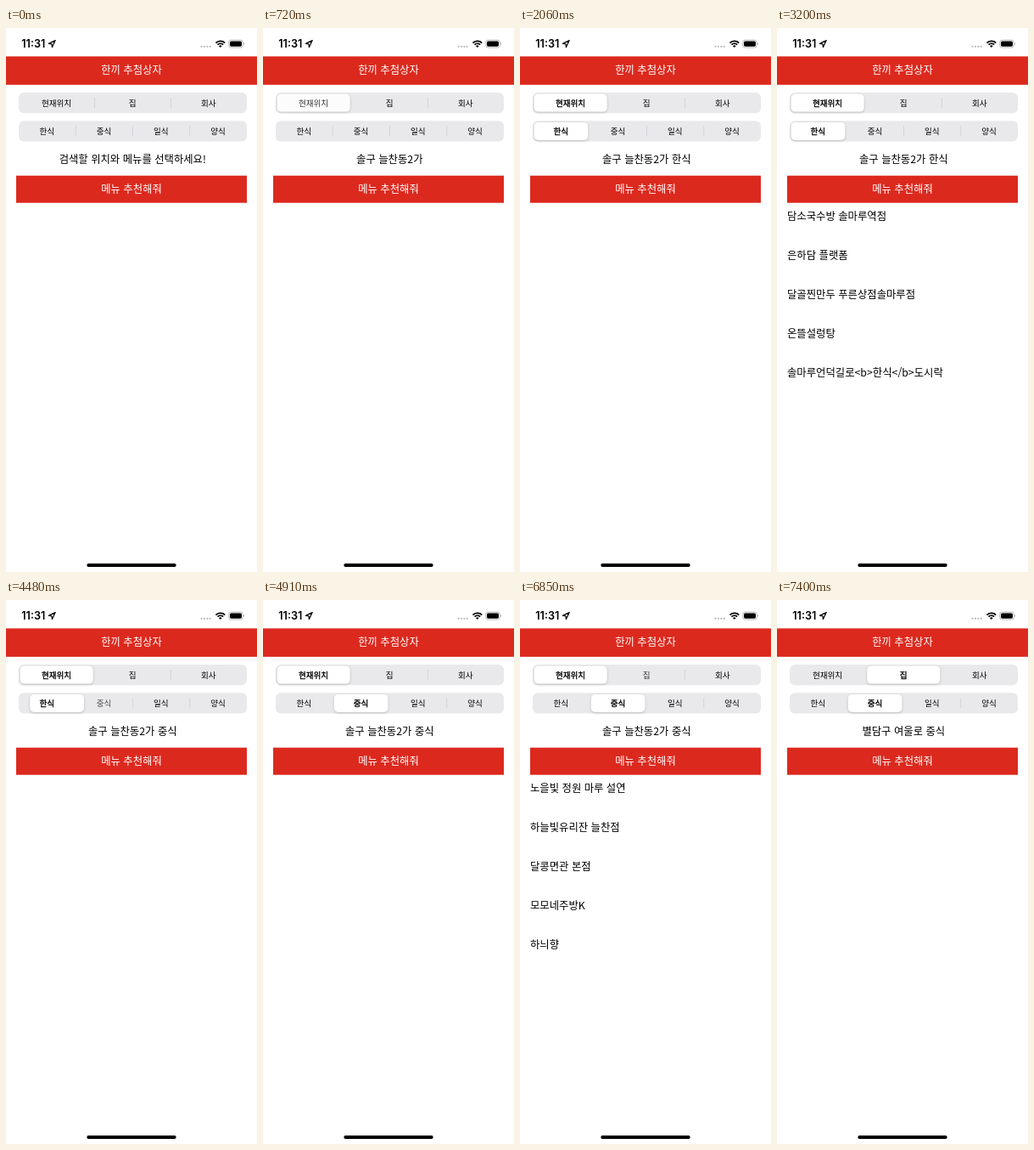
Write an HTML page that moves like this. It is 296 px wide and 640 px high and loops after 8 s.

```html
<!DOCTYPE html>
<html lang="ko">
<head>
<meta charset="utf-8">
<title>메뉴 추천</title>
<style>
  html, body { margin: 0; width: 100%; height: 100%; overflow: hidden; background: #fff; }
  svg { display: block; width: 100%; height: 100%; }
  text { font: 12.35px "Noto Sans CJK KR", "Noto Sans CJK JP", sans-serif; white-space: pre; }
  .mid { text-anchor: middle; }
  .light { fill: #fff; }
  .clock { font: 600 12.6px Inter, sans-serif; }
  .option { font-size: 9.6px; text-anchor: middle; stroke: #000; stroke-width: 0; }
  .thumb { fill: #fff; filter: drop-shadow(0 1.5px 1.8px rgba(0, 0, 0, .2)); }
</style>
</head>
<body>
<svg id="stage" viewBox="0 0 296 640">
  <text class="clock" x="18.3" y="23.2">11:31</text>
  <path d="M58.2 14.6L50.4 18.4L54 18.9L54.4 22.6Z" fill="none" stroke="#000" stroke-width="1.2" stroke-linejoin="round"/>
  <g fill="#b8b8bb">
    <circle cx="230.5" cy="21.8" r="1.1"/><circle cx="233.9" cy="21.8" r="1.1"/>
    <circle cx="237.3" cy="21.8" r="1.1"/><circle cx="240.7" cy="21.8" r="1.1"/>
  </g>
  <g transform="translate(252.8 23)">
    <path d="M-5.4 -5.4A7.6 7.6 0 0 1 5.4 -5.4M-3.3 -3.3A4.7 4.7 0 0 1 3.3 -3.3" fill="none" stroke="#000" stroke-width="1.8"/>
    <path d="M0 0L-1.8 -1.8A2.5 2.5 0 0 1 1.8 -1.8Z"/>
  </g>
  <rect x="262.7" y="14.2" width="16.6" height="8.8" rx="2.7" fill="none" stroke="#a5a5a5" stroke-width=".8"/>
  <rect x="264" y="15.5" width="14" height="6.2" rx="1.6"/>
  <path d="M280.3 17.2A1.5 1.5 0 0 1 280.3 20Z" fill="#a5a5a5"/>

  <rect y="33.4" width="296" height="33.4" fill="#dc291e"/>
  <text class="mid light" x="148" y="54.4">한끼 추첨상자</text>
  <g id="controls"></g>
  <text id="message" class="mid" x="149.3" y="158.7"></text>
  <rect x="12" y="173.7" width="272" height="32" fill="#dc291e"/>
  <text class="mid light" x="148" y="194">메뉴 추천해줘</text>
  <g id="list"></g>
  <rect x="95.3" y="630" width="105.4" height="3.9" rx="1.95"/>
</svg>
<script>
const LOOP = 8000, STEP = 108;
const places = ["솔구 늘찬동2가", "별담구 여울로"];
const menus = ["한식", "중식", "일식", "양식"];
const taps = [
  { at: 500, row: 0, to: 0 },
  { at: 1730, row: 1, to: 0 },
  { at: 4370, row: 1, to: 1 },
  { at: 6850, row: 0, to: 1 },
];
const results = [
  { from: 3200, until: 4370 + STEP,
    names: ["담소국수방 솔마루역점", "은하담 플랫폼", "달골찐만두 푸른상점솔마루점", "온뜰설렁탕", "솔마루언덕길로<b>한식</b>도시락"] },
  { from: 5690, until: 6850 + STEP,
    names: ["노을빛 정원 마루 설연", "하늘빛유리잔 늘찬점", "달콩면관 본점", "모모네주방K", "하늬향"] },
];

const byId = id => document.getElementById(id);

function add(parent, tag, attrs, text = "") {
  const node = document.createElementNS("http://www.w3.org/2000/svg", tag);
  for (const key in attrs) node.setAttribute(key, attrs[key]);
  node.textContent = text;
  return parent.appendChild(node);
}

function segmented(y, labels) {
  const group = byId("controls"), left = 15, cell = 269 / labels.length;
  add(group, "rect", { x: left, y, width: 269, height: 24.2, rx: 6, fill: "#e9e9eb" });
  const dividers = labels.slice(1).map((_, i) =>
    add(group, "rect", { x: left + cell * (i + 1) - .4, y: y + 6, width: .8, height: 12, fill: "#cfcfd3" }));
  const thumb = add(group, "rect", { class: "thumb", y: y + 1.6, width: cell - 3.6, height: 21, rx: 5 });
  const options = labels.map((label, i) =>
    add(group, "text", { class: "option", x: left + cell * (i + .5) - .3, y: y + 15.5 }, label));

  return ({ from, to, step }) => {
    const fresh = from < 0, released = step >= 1;
    const move = fresh ? [0, .4, .9, 1][Math.min(step, 3)] : glide(step);
    const position = fresh ? to : from + (to - from) * move;
    thumb.setAttribute("x", left + 1.6 + cell * Math.max(0, position));
    thumb.style.opacity = to < 0 ? 0 : fresh ? move : 1;

    const bold = move > .92 ? to : from;
    options.forEach((option, i) => {
      option.style.strokeWidth = i === bold ? ".32px" : 0;
      option.style.opacity = i === to && move < .92 ? (released ? .65 + .15 * move : .8) : 1;
    });
    const hiddenBy = (selected, i) => selected >= 0 && (selected === i || selected === i + 1);
    dividers.forEach((divider, i) => {
      divider.style.opacity = 1 - hiddenBy(from, i) * (1 - move) - hiddenBy(to, i) * move;
    });
  };
}

// Critically damped spring, starting on release
function glide(step) {
  if (step < 1) return 0;
  if (step >= 5) return 1;
  const x = 1.5 * (step - .5);
  return 1 - (1 + x) * Math.exp(-x);
}

const rows = [segmented(76, ["현재위치", "집", "회사"]), segmented(109.3, menus)];
const lists = results.map(({ names }) => {
  const group = add(byId("list"), "g", {});
  names.forEach((name, i) => add(group, "text", { x: 12, y: 226 + 45.9 * i }, name));
  return group;
});

function render(t) {
  const states = rows.map(() => ({ from: -1, to: -1, step: 0 }));
  const chosen = [-1, -1];
  for (const { at, row, to } of taps) {
    if (t < at) break;
    const step = Math.min(5, Math.floor((t - at) / STEP));
    states[row] = { from: states[row].to, to, step };
    if (step >= 1) chosen[row] = to;
  }
  rows.forEach((draw, i) => draw(states[i]));

  const [place, menu] = chosen;
  byId("message").textContent = place < 0 ? "검색할 위치와 메뉴를 선택하세요!"
    : menu < 0 ? places[place] : `${places[place]} ${menus[menu]}`;
  lists.forEach((group, i) => {
    const { from, until } = results[i];
    group.style.display = t >= from && t < until ? "" : "none";
  });
}

const start = performance.now();
function tick() {
  render((performance.now() - start) % LOOP);
  requestAnimationFrame(tick);
}
tick();
</script>
</body>
</html>
```
